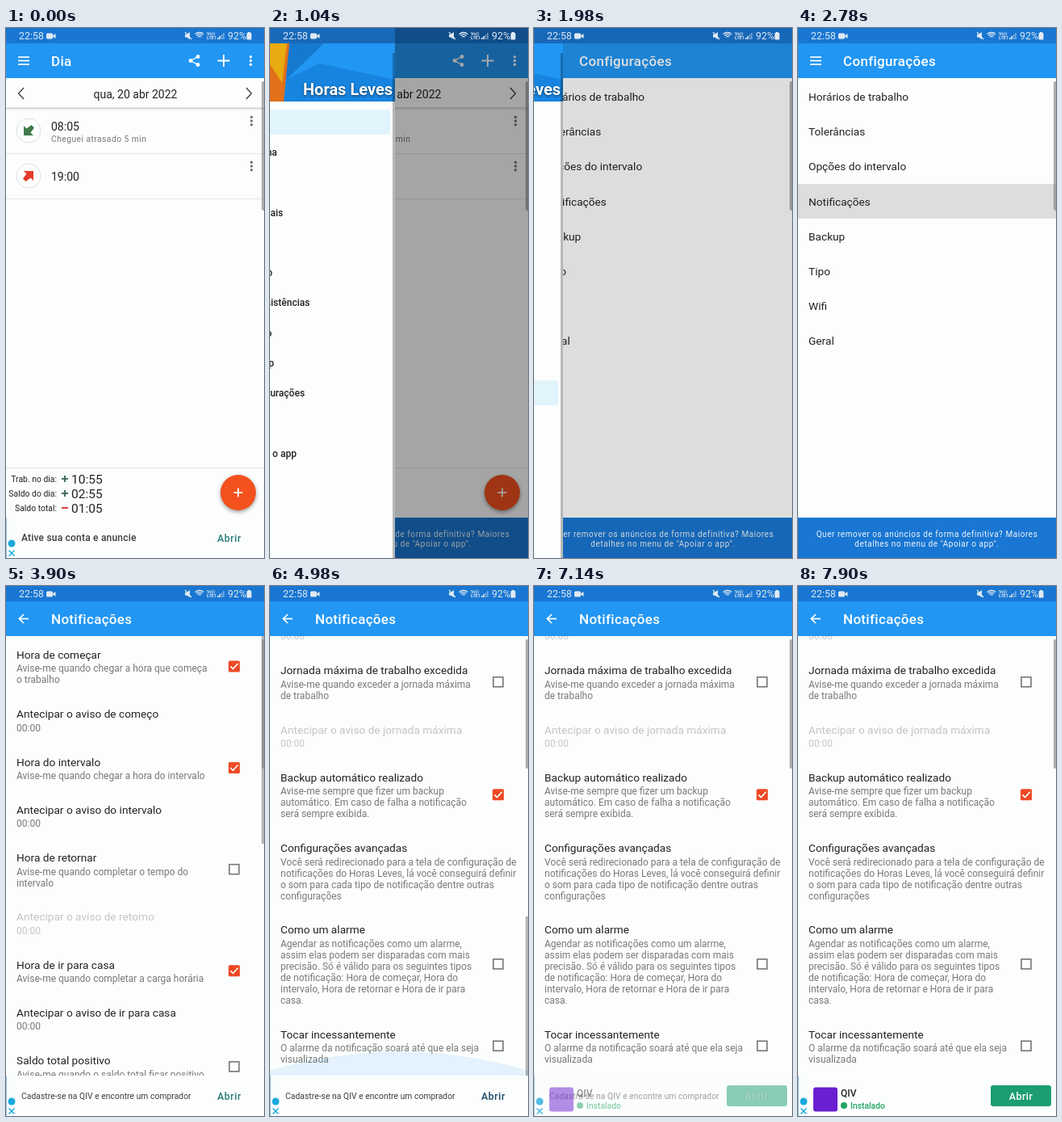
An HTML page with a canvas for the animation above (8 s loop, 320 by 656 pixels).

```html
<!DOCTYPE html>
<html lang="pt-BR">
<head>
<meta charset="utf-8">
<title>Controle de ponto</title>
<style>
html, body { margin: 0; width: 100%; height: 100%; overflow: hidden; background: #fcfefd; }
canvas { display: block; width: 100vw; height: 100vh; }
</style>
</head>
<body>
<canvas id="stage"></canvas>
<script>
const LOOP = 8000, W = 320, H = 656, DRAWER = 246, AD_TOP = 606, MAX_SCROLL = 601.7;
const PAPER = '#fcfefd', INK = '#212322', GREY = '#777977', PALE = '#c3c5c4', ACCENT = '#ee4a26';
const canvas = document.getElementById('stage');
const ctx = canvas.getContext('2d');
const ratio = window.devicePixelRatio || 1;
canvas.width = W * ratio;
canvas.height = H * ratio;

const MENU = ['Dia', 'Semana', 'Mês', 'Especiais', 'Ano', 'Extrato', 'Inconsistências',
  'Salário', 'Backup', 'Configurações', 'Ajuda', 'Apoiar o app'];
const SETTINGS = ['Horários de trabalho', 'Tolerâncias', 'Opções do intervalo', 'Notificações',
  'Backup', 'Tipo', 'Wifi', 'Geral'];

// title, summary, checkbox state, disabled
const PREFS = [
  ['Hora de começar', 'Avise-me quando chegar a hora que começa\no trabalho', true],
  ['Antecipar o aviso de começo', '00:00'],
  ['Hora do intervalo', 'Avise-me quando chegar a hora do intervalo', true],
  ['Antecipar o aviso do intervalo', '00:00'],
  ['Hora de retornar', 'Avise-me quando completar o tempo do\nintervalo', false],
  ['Antecipar o aviso de retorno', '00:00', null, true],
  ['Hora de ir para casa', 'Avise-me quando completar a carga horária', true],
  ['Antecipar o aviso de ir para casa', '00:00'],
  ['Saldo total positivo', 'Avise-me quando o saldo total ficar positivo', false],
  ['Antecipar o aviso de saldo total', '00:00', null, true],
  ['Jornada máxima de trabalho excedida', 'Avise-me quando exceder a jornada máxima\nde trabalho', false],
  ['Antecipar o aviso de jornada máxima', '00:00', null, true],
  ['Backup automático realizado', 'Avise-me sempre que fizer um backup\nautomático. Em caso de falha a notificação\nserá sempre exibida.', true],
  ['Configurações avançadas', 'Você será redirecionado para a tela de configuração de\nnotificações do Horas Leves, lá você conseguirá definir\no som para cada tipo de notificação dentre outras\nconfigurações'],
  ['Como um alarme', 'Agendar as notificações como um alarme,\nassim elas podem ser disparadas com mais\nprecisão. Só é válido para os seguintes tipos\nde notificação: Hora de começar, Hora do\nintervalo, Hora de retornar e Hora de ir para\ncasa.', false],
  ['Tocar incessantemente', 'O alarme da notificação soará até que ela seja\nvisualizada', false]
];

// Linear interpolation through [time, value] keys
function track(t, keys) {
  if (t <= keys[0][0]) return keys[0][1];
  for (let i = 1; i < keys.length; i++) {
    const [t0, v0] = keys[i - 1], [t1, v1] = keys[i];
    if (t < t1) return v0 + (v1 - v0) * (t - t0) / (t1 - t0);
  }
  return keys[keys.length - 1][1];
}

// y is the middle of the capitals
function text(s, x, y, size, color, weight = 400, align = 'left', spacing = 0) {
  ctx.font = `${weight} ${size}px Roboto, sans-serif`;
  ctx.letterSpacing = spacing + 'px';
  ctx.textAlign = align;
  ctx.fillStyle = color;
  ctx.fillText(s, x, y + size * 0.36);
}
function rect(x, y, w, h, color, radius = 0) {
  ctx.fillStyle = color;
  ctx.beginPath();
  ctx.roundRect(x, y, w, h, radius);
  ctx.fill();
}
function disc(x, y, r, color) {
  ctx.fillStyle = color;
  ctx.beginPath();
  ctx.arc(x, y, r, 0, 7);
  ctx.fill();
}
function poly(color, ...p) {
  ctx.fillStyle = color;
  ctx.beginPath();
  for (let i = 0; i < p.length; i += 2) ctx.lineTo(p[i], p[i + 1]);
  ctx.fill();
}
function line(color, width, ...p) {
  ctx.strokeStyle = color;
  ctx.lineWidth = width;
  ctx.beginPath();
  for (let i = 0; i < p.length; i += 2) ctx.lineTo(p[i], p[i + 1]);
  ctx.stroke();
}
function plus(x, y, r, width, color) {
  line(color, width, x - r, y, x + r, y);
  line(color, width, x, y - r, x, y + r);
}
function dots(x, y, gap, r, color) {
  for (let i = -1; i < 2; i++) disc(x, y + i * gap, r, color);
}

function toolbar(title, back) {
  rect(0, 0, W, 19, '#1976d2');
  rect(0, 19, W, 43, '#2196f3');
  if (back) {
    line('#fff', 1.7, 28, 40.5, 16.5, 40.5);
    line('#fff', 1.7, 22, 35, 16.5, 40.5, 22, 46);
  } else {
    for (const y of [36, 40.5, 45]) line('#fff', 1.7, 15, y, 29, y);
  }
  text(title, 56, 41, 17, '#fff', 500, 'left', 0.3);
}

function status() {
  const c = '#dfe9f3';
  text('22:58', 16, 10, 12.4, c);
  rect(50, 6.5, 8, 7, c, 1.5);
  poly(c, 57, 10, 61.5, 7, 61.5, 13);
  poly(c, 222, 8, 224, 8, 228, 5, 228, 14, 224, 11.5, 222, 11.5);
  line(c, 1.2, 222, 5, 230, 14);
  ctx.strokeStyle = c;
  ctx.lineWidth = 1.3;
  for (const r of [2.5, 5, 7.5]) {
    ctx.beginPath();
    ctx.arc(240, 13, r, -2.35, -0.8);
    ctx.stroke();
  }
  text('Vo))', 249, 7, 5.5, c, 700);
  text('LTE1', 249, 12, 5.5, c, 700);
  for (let i = 0; i < 4; i++)
    rect(262 + i * 2.4, 12 - i * 2, 1.6, 2 + i * 2, i < 2 ? c : 'rgba(223,233,243,.5)');
  text('92%', 275, 10, 12.4, c);
  rect(298.5, 6, 6, 8.5, c, 1);
  rect(300, 5, 3, 1.5, c);
}

function clockArrow(x, y, angle, color) {
  ctx.strokeStyle = '#dfe1e0';
  ctx.lineWidth = 1;
  ctx.beginPath();
  ctx.arc(x, y, 15, 0, 7);
  ctx.stroke();
  ctx.save();
  ctx.translate(x, y);
  ctx.rotate(angle);
  poly(color, -6, -6, 6, -6, 6, 6, 2.5, 2.5, -3.5, 7, -7, 3.5, -2.5, -2.5);
  ctx.restore();
}

function dayPage() {
  rect(0, 0, W, H, PAPER);
  toolbar('Dia');
  line('#fff', 1.4, 238, 35.5, 229, 40.5, 238, 45.5);
  for (const [x, y] of [[238, 35.5], [229, 40.5], [238, 45.5]]) disc(x, y, 2.4, '#fff');
  plus(270, 40.5, 7.5, 2, '#fff');
  dots(303.5, 40.5, 4.7, 1.7, '#fff');

  line('#333', 1.2, 22, 74, 15.5, 81, 22, 88);
  line('#333', 1.2, 298, 74, 304.5, 81, 298, 88);
  text('qua, 20 abr 2022', 160.5, 81.5, 14, INK, 400, 'center');
  rect(0, 98.5, W, 1.5, '#d0d2d1');
  rect(0, 100, W, 2, '#f0f2f1');

  clockArrow(28, 127, Math.PI, '#3f7a4a');
  text('08:05', 56, 121.5, 14, INK);
  text('Cheguei atrasado 5 min', 56, 137, 10.3, GREY, 400, 'left', 0.45);
  clockArrow(28, 183, 0, '#e53c2c');
  text('19:00', 56, 184, 14, INK);
  for (const y of [115, 171]) dots(304.5, y, 4.7, 1.7, '#777');
  for (const y of [155, 211, 544]) rect(0, y, W, 1, '#e3e5e4');

  const totals = [['Trab. no dia:', '10:55'], ['Saldo do dia:', '02:55'], ['Saldo total:', '01:05']];
  totals.forEach(([label, value], i) => {
    const y = 558 + i * 18;
    text(label, 63, y, 10.4, INK, 400, 'right');
    if (i < 2) plus(73, y, 4, 2, '#46705a');
    else line('#dd3e48', 2, 69, y, 77, y);
    text(value, 81, y, 15.5, INK);
  });
  ctx.save();
  ctx.shadowColor = 'rgba(0,0,0,.4)';
  ctx.shadowBlur = 5 * ratio;
  ctx.shadowOffsetY = 2 * ratio;
  disc(288, 575, 22, '#f4511e');
  ctx.restore();
  plus(288, 575, 5.5, 1.7, '#fff');
}

function settingsPage(t) {
  rect(0, 0, W, H, PAPER);
  const press = track(t, [[2570, 0], [2660, 1], [2900, 1], [3100, 0]]);
  rect(0, 193, W, 43, `rgba(0,0,0,${0.13 * press})`);
  SETTINGS.forEach((name, i) => text(name, 13, 85 + i * 43.2, 13.7, INK));
  toolbar('Configurações');
}

function checkbox(x, y, on) {
  if (!on) {
    ctx.strokeStyle = '#747675';
    ctx.lineWidth = 1.6;
    ctx.strokeRect(x - 6, y - 6, 12, 12);
    return;
  }
  rect(x - 7, y - 7, 14, 14, ACCENT, 1.5);
  line('#fff', 1.6, x - 4.5, y, x - 1.5, y + 3.2, x + 4.7, y - 3.5);
}

function prefsPage(t) {
  rect(0, 0, W, H, PAPER);
  const scroll = track(t, [[4440, 0], [4530, 90], [4620, 260], [4710, 430], [4800, 540], [4900, MAX_SCROLL]]);
  const press = track(t, [[5950, 0], [6080, 1], [6400, 1], [6590, 0]]);
  let top = 62 - scroll;
  for (const [title, summary, checked, disabled] of PREFS) {
    const lines = summary.split('\n'), height = 45.3 + 14 * lines.length;
    if (title === 'Como um alarme') rect(0, top, W, height, `rgba(0,0,0,${0.13 * press})`);
    text(title, 13, top + 23, 13.7, disabled ? PALE : INK);
    lines.forEach((s, i) => text(s, 13, top + 40 + i * 14, 12, disabled ? PALE : GREY));
    if (typeof checked === 'boolean') checkbox(283, top + height / 2 + 0.8, checked);
    top += height;
  }
  const glow = track(t, [[4870, 0], [4940, 1], [5060, 1], [5180, 0]]);
  if (glow) {
    ctx.fillStyle = `rgba(33,150,243,${0.11 * glow})`;
    ctx.beginPath();
    ctx.moveTo(-5, AD_TOP);
    ctx.lineTo(-5, AD_TOP - 5 * glow);
    ctx.quadraticCurveTo(160, AD_TOP - 54 * glow, 325, AD_TOP - 5 * glow);
    ctx.lineTo(325, AD_TOP);
    ctx.fill();
  }
  const bar = track(t, [[4020, 1], [4140, 0], [4439, 0], [4440, 1], [5280, 1], [5730, 0]]);
  const part = scroll / MAX_SCROLL;
  rect(317, 62 + 347 * part, 3, 257 - 60 * part, `rgba(0,0,0,${0.28 * bar})`);
  toolbar('Notificações', true);
}

function banner() {
  rect(0, AD_TOP, W, 50, '#1976d2');
  text('Quer remover os anúncios de forma definitiva? Maiores', 160, 626, 10, '#eef5fb', 400, 'center', 0.55);
  text('detalhes no menu de "Apoiar o app".', 160, 638, 10, '#eef5fb', 400, 'center', 0.55);
}

function adFrame() {
  rect(0, AD_TOP, W, 50, PAPER);
  rect(0, AD_TOP, 1, 50, '#8cc6ea');
  disc(7, 638, 4.5, '#18a9dc');
  line('#18a9dc', 1.5, 3.5, 646.5, 10.5, 653.5);
  line('#18a9dc', 1.5, 10.5, 646.5, 3.5, 653.5);
}

function textAd(s, size, weight, spacing, action) {
  adFrame();
  text(s, 19, 631, size, '#3b3e3d', weight, 'left', spacing);
  text('Abrir', 262, 631, 12.5, action, 500, 'left', 0.5);
}

function installedAd() {
  adFrame();
  rect(19, 620.5, 30, 30, '#6a1fd0', 3);
  text('QIV', 53, 628, 12, INK, 500);
  disc(57, 643, 4, '#1fa463');
  text('Instalado', 65, 643, 10.3, '#1fa463', 500);
  rect(239, 618, 75, 26, '#1d9e70', 3);
  text('Abrir', 276.5, 631, 12.5, '#fff', 500, 'center', 0.4);
}

function ad(t) {
  if (t < 670) return textAd('Ative sua conta e anuncie', 12, 500, 0.2, '#2b7c78');
  if (t < 3530) return banner();
  textAd('Cadastre-se na QIV e encontre um comprador', 10.3, 400, 0.05, t < 4440 ? '#2b7c78' : '#1d4a68');
  if (t < 7040) return;
  ctx.save();
  ctx.globalAlpha = track(t, [[7040, 0.2], [7300, 1]]);
  installedAd();
  ctx.restore();
}

function drawer(t) {
  const x = track(t, [[1039, 0], [1040, 155], [1130, 155], [1220, 214], [1330, 239], [1470, DRAWER],
    [1879, DRAWER], [1880, 140], [1970, 80], [1980, 36], [2070, 36], [2180, 9], [2280, 0]]);
  if (x <= 0) return;
  rect(0, 0, W, H, `rgba(0,0,0,${Math.min(1, x / 30) * (0.065 + 0.45 * x / DRAWER)})`);
  ctx.save();
  ctx.translate(x - DRAWER, 0);
  rect(0, 0, DRAWER, H, PAPER);
  rect(0, 0, DRAWER, 91, '#2196f3');
  poly('#1785df', 107, 91, 110, 64, 153, 44, DRAWER, 64, DRAWER, 91);
  poly('#1679d0', 114, 19, 158, 19, 109, 66);
  poly('#e0701a', 0, 19, 115, 19, 108, 91, 0, 91);
  poly('#e8ab10', 0, 19, 112, 19, 106, 68, 91, 45, 0, 30);
  rect(0, 0, DRAWER, 19, '#1869b8');
  ctx.shadowColor = 'rgba(0,0,0,.6)';
  ctx.shadowBlur = 3 * ratio;
  ctx.shadowOffsetY = ratio;
  text('Horas Leves', DRAWER - 3, 76, 20, '#fff', 700, 'right');
  ctx.shadowColor = 'transparent';
  const active = t < 1700 ? 0 : 9;
  rect(3, 101 + active * 37.25, DRAWER - 9, 31, '#e1f4fc', 4);
  MENU.forEach((name, i) => {
    const y = 116.5 + i * 37.25;
    rect(16, y - 5, 11, 11, '#777', 2);
    text(name, 56, y, 12, INK, 500);
  });
  rect(DRAWER - 3, 31, 3, H - 31, 'rgba(0,0,0,.28)');
  ctx.restore();
}

function draw(now) {
  const t = now % LOOP;
  ctx.setTransform(canvas.width / W, 0, 0, canvas.height / H, 0, 0);
  if (t < 1880) dayPage();
  else if (t < 3160) settingsPage(t);
  if (t >= 2780) {
    const shown = track(t, [[2780, 0], [2900, 0.6], [3020, 0.92], [3160, 1]]);
    ctx.save();
    ctx.globalAlpha = shown;
    ctx.translate(0, 60 * (1 - shown));
    prefsPage(t);
    ctx.restore();
  }
  ad(t);
  rect(317, 66, 4, 160, 'rgba(120,124,124,.6)', 2);
  drawer(t);
  status();
}

let start;
function frame(now) {
  start ??= now;
  draw(now - start);
  requestAnimationFrame(frame);
}
requestAnimationFrame(frame);
</script>
</body>
</html>
```
